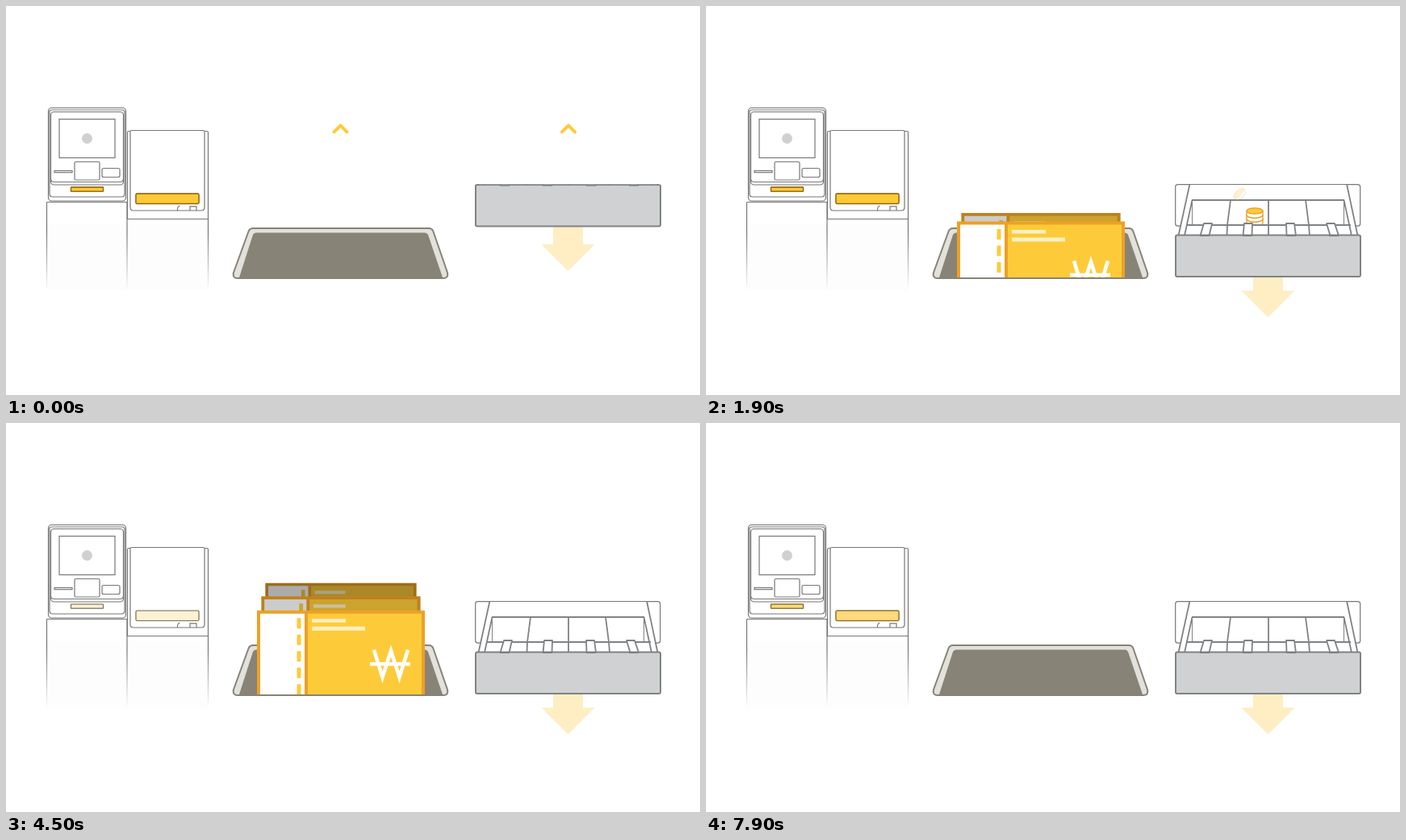
Recreate the animation shown at these times as an HTML page. Size 860 px wide and 483 px high, loop 8 s.

```html
<!DOCTYPE html>
<html lang="en">
<head>
<meta charset="utf-8">
<title>Cash dispenser</title>
<style>
  html, body { margin: 0; width: 100%; height: 100%; overflow: hidden; background: #fff; }
  svg { display: block; width: 860px; height: 483px; }
  .line { fill: none; stroke: #777; stroke-width: 1.2; }
  .white { fill: #fff; }
  .glow { fill: #ffc938; stroke: #8f6508; stroke-width: 1.3; }
  .box { fill: none; stroke: #808284; stroke-width: 1.8; stroke-linejoin: round; }
  .coin { stroke: #eb9a22; stroke-width: 1.3; }
  .chevron { fill: none; stroke: #ffc938; stroke-width: 4; stroke-linecap: round; stroke-linejoin: round; }
</style>
</head>
<body>
<svg viewBox="0 0 860 483">
  <defs>
    <linearGradient id="fade" gradientUnits="userSpaceOnUse" x1="0" y1="243" x2="0" y2="353">
      <stop offset=".35" stop-color="#777"/><stop offset="1" stop-color="#777" stop-opacity="0"/>
    </linearGradient>
    <clipPath id="trayClip"><path d="M270 0H560V337H270Z"/></clipPath>
    <clipPath id="drawerClip"><path d="M570 221.5H830V400H570Z"/></clipPath>
    <clipPath id="coinClip"><path d="M570 150H830V271.2H570Z"/></clipPath>
    <g id="coin" class="coin">
      <path class="white" d="M-10 0V5A10 3.7 0 0 0 10 5V0Z"/>
      <ellipse rx="10" ry="3.7" fill="#fdcb3a"/>
    </g>
    <g id="bill">
      <path fill="#eda125" d="M0 0H208V125H0Z"/>
      <path fill="#fff" d="M4 4H59V121H4Z"/>
      <path fill="#fdcb3a" d="M63 4H204V121H63Z"/>
      <path stroke="#fdcb3a" stroke-width="5" stroke-dasharray="13 7.5" d="M52 9.5V118"/>
      <path fill="#ffefc2" d="M68 10.5H110V15H68ZM68 20H134V25H68Z"/>
      <path fill="none" stroke="#fff" stroke-width="4.5" d="M145 49L155.500 83L166 50L176.500 83L187 49M140 66.500H190"/>
    </g>
  </defs>

  <!-- machines -->
  <path fill="#fdfdfd" d="M51 271H250V353H51Z"/>
  <g class="line">
    <path stroke="url(#fade)" d="M50.500 243.500V353M150 243.500V353M250.500 264V353"/>
    <path d="M50.500 243.500H150M150 264.500H250.500"/>
    <rect x="52.500" y="126.500" width="96" height="115.500" rx="4" class="white"/>
    <path d="M54 131Q54 129 57 129H144Q147 129 147 132V233Q147 237 143 237H58Q54 237 54 233Z"/>
    <rect x="55.500" y="131.500" width="90" height="90.500" rx="4"/>
    <path d="M55.500 215Q56 218.500 60 218.500H141Q145 218.500 145.500 215"/>
    <rect x="66" y="140.500" width="69" height="48"/>
    <rect x="60" y="204.500" width="22" height="2.200"/>
    <rect x="85" y="193.500" width="31" height="22.500" rx="1.500"/>
    <rect x="119" y="201.500" width="22" height="11" rx="2"/>
    <rect x="80.500" y="225" width="40" height="5.200" rx=".5"/>
    <path d="M154 155.500H152Q150.500 155.500 150.500 157V264M246 155.500H249Q250.500 155.500 250.500 157V264"/>
    <path d="M154 156Q154 154.500 156 154.500H244Q246 154.500 246 156V250Q246 254 242 254H158Q154 254 154 250Z"/>
    <rect x="161" y="233" width="78" height="12.500" rx="1.500"/>
    <path d="M212.500 254Q212 249 215.500 248M228 254V248.800H236V254"/>
  </g>
  <circle cx="100.500" cy="164.500" r="6.500" fill="#d0d0d0"/>
  <g id="slots" class="glow">
    <rect x="80.500" y="225" width="40" height="5.200" rx=".5"/>
    <rect x="161" y="233" width="78" height="12.500" rx="1.500"/>
  </g>

  <!-- note tray -->
  <path fill="#e2e1db" stroke="#878377" stroke-width="2" d="M306 276H524Q528 276 529.500 280L547 331Q548.500 338 542 338H287Q280.500 338 282 331L300.500 280Q302 276 306 276Z"/>
  <path fill="#888377" d="M310 281.500H519Q522 281.500 523 284L541 337H289L306 284Q307 281.500 310 281.500Z"/>
  <g clip-path="url(#trayClip)"><g id="bills"></g></g>

  <!-- coin drawer -->
  <path id="arrow" fill="#ffeec4" d="M678 325H715V353.500H729.500L696.500 386.500L663.500 353.500H678Z"/>
  <rect x="581.700" y="221.700" width="229" height="51.500" rx="3" class="line white"/>
  <g clip-path="url(#drawerClip)">
    <g id="drawer">
      <path fill="#fff" d="M599.500 222H794L807.500 285H585.500Z"/>
      <g class="box">
        <path stroke-width="1" d="M602.500 241V272M790.500 241V272"/>
        <path d="M599.500 221L585.500 285M602.500 241L593 285M794 221L807.500 285M790.500 241L800 285M602 241H791M650 241L646 272L645.500 285M697 241V285M743 241L747 272L748 285"/>
        <g id="coins" stroke="none" clip-path="url(#coinClip)"></g>
        <path d="M595 272H799"/>
        <path class="white" d="M617 270H627L623.500 285H612.500ZM667 270H677L676.500 285H665.500ZM719 270H729L731 285H719.500ZM769 270H779L784 285H773.500Z"/>
      </g>
      <rect x="582" y="284.500" width="229" height="51.500" rx="2" fill="#d0d1d3" stroke="#808284" stroke-width="2"/>
      <path stroke="#77797b" d="M612 285.500H624M665 285.500H677M719 285.500H731M772 285.500H784"/>
    </g>
  </g>
  <g id="flying"></g>
  <g id="chevrons"></g>
</svg>
<script>
const LOOP = 8000;
const $ = id => document.getElementById(id);
const clamp = x => Math.min(1, Math.max(0, x));
const sine = x => (1 - Math.cos(Math.PI * clamp(x))) / 2;
const move = (el, x, y, rest = '') => el.setAttribute('transform', `translate(${x} ${y}) ${rest}`);

function add(parent, tag, attrs) {
  const el = document.createElementNS('http://www.w3.org/2000/svg', tag);
  for (const name in attrs) el.setAttribute(name, attrs[name]);
  return parent.appendChild(el);
}

// back to front
const bills = [
  { scale: 0.9, top: 233.5, start: 2200, shade: 0.33 },
  { scale: 0.948, top: 250, start: 1100, shade: 0.2 },
  { scale: 1, top: 267.5, start: 0, shade: 0 },
].map(bill => {
  const el = add($('bills'), 'g', {});
  add(el, 'use', { href: '#bill' });
  add(el, 'path', { d: 'M0 0H208V125H0Z', 'fill-opacity': bill.shade });
  return { ...bill, el };
});

// x, resting y, lift-off time; bottom coins first
const coins = [
  [680, 264.5, 3480], [680, 259.5, 2790], [680, 254.5, 2100], [680, 249.5, 1150],
  [660, 267.5, 1440], [660, 262.5, 1240], [660, 257.5, 1000],
].map(([x, y, start]) => ({
  x, y, start,
  still: add($('coins'), 'use', { href: '#coin', x, y }),
  flying: add($('flying'), 'use', { href: '#coin' }),
}));
const leaning = add($('coins'), 'ellipse',
  { class: 'coin', cx: 686.5, cy: 269, rx: 9.5, ry: 8.5, fill: '#fdcb3a' });

const chevrons = [414.5, 697].flatMap(x => [0, 1, 2].map(row => ({
  x, row, el: add($('chevrons'), 'path', { class: 'chevron', d: 'M-8 8L0 0L8 8' }),
})));

function drawSlots(t) {
  const p = t % 1900;
  $('slots').style.opacity = p < 900 ? 1 - p / 900 : clamp((p - 900) / 900);
}

function drawChevrons(t) {
  const p = (t + 200) % 3000 - 200;
  const y = 121.5 + 27 * Math.max(0, 1 - p / 1300) ** 3;
  const fade = clamp((p + 200) / 200) * clamp(1 - (p - 240) / 1200);
  for (const { x, row, el } of chevrons) {
    move(el, x, y + row * 9.8);
    const reveal = row ? clamp((p - 100 * (row - 1)) / 200) : 1;
    el.style.opacity = fade * reveal * [1, 0.8, 0.65][row];
  }
}

function drawBills(t) {
  const exit = clamp((t - 4000) / 1150);
  for (const { el, scale, top, start } of bills) {
    const y = 337.5 - (337.5 - top) * sine((t - start) / 980) - 87 * sine(exit);
    move(el, 415 - 104 * scale, y, `scale(${scale})`);
  }
  $('bills').style.opacity = clamp((1 - exit) / 0.5);
}

function drawDrawer(t) {
  const closed = 1 - sine(t / 900);
  move($('drawer'), 0, -62.5 * closed);
  move($('arrow'), 0, -57.5 * closed);
  for (const { x, y, start, still, flying } of coins) {
    const u = (t - start) / 600;
    still.style.opacity = u < 0 ? 1 : 0;
    flying.style.opacity = u < 0 ? 0 : clamp(1 - u);
    move(flying, x, y - 46 * clamp(u), `rotate(${-45 * clamp(u * 2)}) scale(${1 - 0.25 * clamp(u)})`);
  }
  leaning.style.opacity = clamp(1 - (t - 860) / 400);
}

function render(now) {
  const t = now % LOOP;
  drawSlots(t);
  drawChevrons(t);
  drawBills(t);
  drawDrawer(t);
}

const begin = performance.now();
function tick() {
  render(performance.now() - begin);
  requestAnimationFrame(tick);
}
tick();
</script>
</body>
</html>
```
